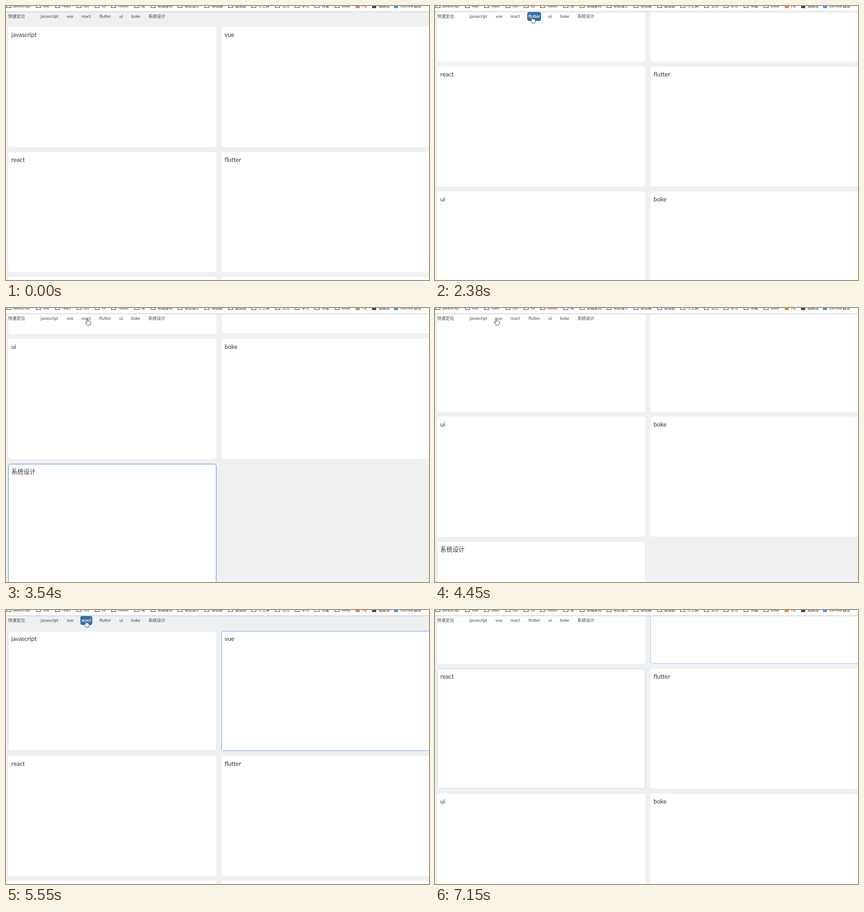
Write an HTML page that moves like this. It is 929x603 px and loops after 7.22 s.

```html
<!DOCTYPE html>
<html lang="zh">
<head>
<meta charset="utf-8">
<title>Quick navigation</title>
<style>
html, body { margin: 0; width: 100%; height: 100%; overflow: hidden; background: #eff0f2; }
svg { display: block; position: absolute; left: 0; top: 0; }
text { font-family: Lato, "Noto Sans CJK SC", "Noto Sans CJK", sans-serif; fill: #333; }
.title { font-size: 13.33px; }
.nav { font-size: 9.33px; fill: #444; }
.nav.on { fill: #fff; font-weight: bold; font-size: 9px; }
.mark { font-family: "Noto Sans", "Noto Sans CJK SC", "Noto Sans CJK", sans-serif; font-size: 8px; fill: #222; }
</style>
</head>
<body>
<svg id="stage" width="929" height="603" viewBox="0 0 929 603"></svg>
<script>
const LOOP = 7220, ROW = 275, HOVER_LAG = 70;
const stage = document.getElementById('stage');

function add(parent, tag, attrs, text) {
  const node = document.createElementNS('http://www.w3.org/2000/svg', tag);
  for (const key in attrs) node.setAttribute(key, attrs[key]);
  if (text) node.textContent = text;
  return parent.appendChild(node);
}

const names = ['javascript', 'vue', 'react', 'flutter', 'ui', 'boke', '系统设计'];

// Card border pulses: start, period, count
const pulses = {
  flutter: [2340, 650, 2],
  系统设计: [3235, 650, 2],
  javascript: [4825, 850, 2],
  vue: [5245, 850, 3],
  react: [5890, 700, 3]
};

const page = add(stage, 'g', {});
const cards = names.map((name, i) => {
  const x = i % 2 ? 473 : 4.8, y = 46 + Math.floor(i / 2) * ROW;
  add(page, 'rect', { x, y, width: 457.4, height: 264.2, rx: 5, fill: '#fff' });
  const border = add(page, 'rect', {
    x: x + .5, y: y + .5, width: 456.4, height: 263.2, rx: 4.5,
    fill: 'none', stroke: '#3b7cdb', opacity: 0
  });
  add(page, 'text', { x: x + 7, y: y + 22, class: 'title' }, name);
  return { border, pulse: pulses[name] };
});

// Navigation
add(stage, 'text', { x: 4.7, y: 26, class: 'nav' }, '快速定位');
const navLeft = [76, 133, 166, 205.3, 249, 274.7, 312.7];
const navRight = [114.5, 147.5, 186.5, 230, 256, 294, 350];
const items = names.map((name, i) => {
  const left = navLeft[i] - 2.7, right = navRight[i] + 3;
  const pill = add(stage, 'rect', { x: left, y: 13, width: right - left, height: 20, rx: 4.5, fill: '#3270a8' });
  const label = add(stage, 'text', { x: navLeft[i], y: 26, class: 'nav' }, name);
  return { left, right, pill, label };
});

// Bookmark bar
add(stage, 'rect', { width: 929, height: 12, fill: '#fff' });
add(stage, 'rect', { y: 12, width: 929, height: 1.3, fill: '#c9cacc' });
const marks = [
  [1, 'JavaScript'], [66, 'vue'], [108, 'react'], [155, 'css'], [195, 'UI'], [231, 'flutter'],
  [282, '库'], [318, '前端架构'], [377, '系统设计'], [436, '移动端'], [488, '面试题'], [539, '小工具'],
  [591, '公司'], [634, '学习'], [678, '待看'], [722, 'boke']
];
for (const [x, label] of marks) {
  add(stage, 'path', { d: `M${x + .5} -3V3.5H${x + 10}V-3`, fill: 'none', stroke: '#333', 'stroke-width': 1.1 });
  add(stage, 'text', { x: x + 15.5, y: 3, class: 'mark' }, label);
}
for (const [x, color, label] of [[768, '#d98a36', 'HL'], [804, '#4b3833', '插画馆'], [852, '#4b94d8', 'Lumiva 翻译']]) {
  add(stage, 'rect', { x, y: -5, width: 9, height: 9.5, fill: color });
  add(stage, 'text', { x: x + 14.5, y: 3, class: 'mark' }, label);
}

// Pointers, with the tip at the origin
const ink = { fill: '#fff', stroke: '#222', 'stroke-width': .9, 'stroke-linejoin': 'round' };
const arrow = add(stage, 'path', { d: 'M0 0V11L2.6 8.6L4.3 12.4L6 11.6L4.3 8H7.6Z', ...ink });
const hand = add(stage, 'path', {
  d: 'M-1 .5Q0 -1 1.2 .5V5.4Q2.6 4.3 3.6 5.8Q4.9 4.9 5.8 6.4Q7.6 6 7.6 8V10.5Q7.4 12.6 6.2 14.8H0Q-1 12.6 -4 9.3Q-4.4 7.2 -2.4 7.9L-1 9.2Z',
  ...ink
});

const scrollKeys = [
  [620, 0], [1000, 132], [2180, 132], [2417, 192], [3200, 192], [3420, 528],
  [4380, 528], [4567, 0], [5900, 0], [6110, 192]
];
const pointerKeys = [
  [0, 910, 630], [70, 880, 588], [410, 463, 273], [620, 463, 273], [1300, 252, 163], [1440, 252, 163],
  [1800, 206, 70], [2100, 213, 23], [2860, 213, 23], [3080, 330, 23], [3350, 330, 23], [3540, 179, 23],
  [3700, 97, 23], [4290, 100, 23], [4450, 134, 23], [5250, 136, 23], [5420, 175, 23], [5890, 175, 23],
  [6100, 277, 36], [6660, 780, 380], [7080, 912, 614]
];

const linear = p => p;
const smooth = p => p * p * (3 - 2 * p);

function sample(keys, t, ease, column = 1) {
  const next = keys.findIndex(key => key[0] > t);
  if (next === 0) return keys[0][column];
  if (next < 0) return keys[keys.length - 1][column];
  const a = keys[next - 1], b = keys[next];
  return a[column] + (b[column] - a[column]) * ease((t - a[0]) / (b[0] - a[0]));
}

const pointerAt = t => [sample(pointerKeys, t, linear, 1), sample(pointerKeys, t, linear, 2)];

const itemAt = ([x, y]) => y < 33 ? items.find(item => x >= item.left && x <= item.right) : undefined;

function glow(pulse, t) {
  if (!pulse) return 0;
  const turns = (t - pulse[0]) / pulse[1];
  return turns > 0 && turns < pulse[2] ? (1 - Math.cos(2 * Math.PI * turns)) / 2 : 0;
}

const show = (node, visible) => node.setAttribute('visibility', visible ? 'visible' : 'hidden');

function draw(t) {
  page.setAttribute('transform', `translate(0 ${-Math.round(sample(scrollKeys, t, smooth))})`);
  for (const { border, pulse } of cards) border.setAttribute('opacity', glow(pulse, t).toFixed(3));

  const hovered = itemAt(pointerAt(t - HOVER_LAG));
  for (const item of items) {
    show(item.pill, item === hovered);
    item.label.setAttribute('class', item === hovered ? 'nav on' : 'nav');
  }

  const [x, y] = pointerAt(t);
  const pointing = Boolean(itemAt([x, y]));
  show(hand, pointing);
  show(arrow, !pointing);
  (pointing ? hand : arrow).setAttribute('transform', `translate(${x.toFixed(1)} ${y.toFixed(1)})`);
}

const start = performance.now();
function tick() {
  draw((performance.now() - start) % LOOP);
  requestAnimationFrame(tick);
}
tick();
</script>
</body>
</html>
```
